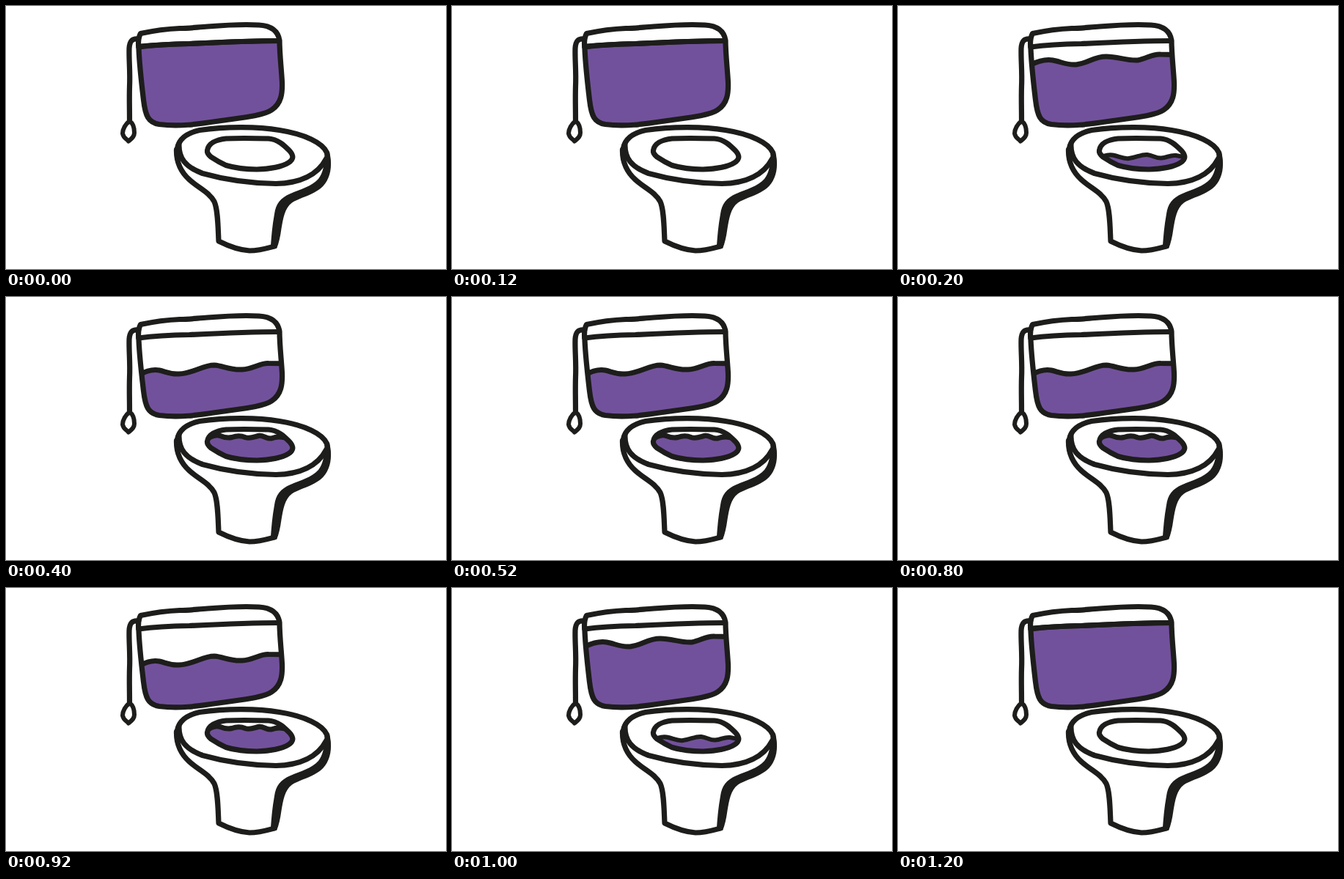
These frames come from a looping animation (600 px wide and 359 px high, 1.4 s). An HTML page:

```html
<!DOCTYPE html>
<html lang="en">
<head>
<meta charset="utf-8">
<title>Flush</title>
<style>
  html, body { margin: 0; width: 100%; height: 100%; overflow: hidden; background: #fff; }
  svg { display: block; width: 100%; height: 100%; }
  .ink { fill: none; stroke: #1d1d1b; stroke-width: 7.2; stroke-linecap: round; stroke-linejoin: round; }
  .water { fill: #72519c; stroke: #1d1d1b; stroke-width: 7; stroke-linejoin: round; }
  .thin { stroke-width: 6; }

  /* Levels are held for 200 ms each: full, high, mid, low, mid, high, full */
  .level { visibility: hidden; animation: 1.4s step-end infinite; }
  .full { animation-name: full; }
  .high { animation-name: high; }
  .mid { animation-name: mid; }
  .low { animation-name: low; }
  @keyframes full {
    0%, 85.7142% { visibility: visible; }
    14.2857%, 100% { visibility: hidden; }
  }
  @keyframes high {
    0%, 28.5714%, 85.7142%, 100% { visibility: hidden; }
    14.2857%, 71.4285% { visibility: visible; }
  }
  @keyframes mid {
    0%, 42.8571%, 71.4285%, 100% { visibility: hidden; }
    28.5714%, 57.1428% { visibility: visible; }
  }
  @keyframes low {
    0%, 57.1428%, 100% { visibility: hidden; }
    42.8571% { visibility: visible; }
  }
</style>
</head>
<body>
<svg viewBox="0 0 600 359" role="img" aria-label="A cistern emptying into a toilet bowl and refilling">
  <defs>
    <path id="tank" d="M183.5 37.5 C180 44 180 50 181 58 C182 82 185 107 187.5 128 C190 150 194 159 209 161.5 C235 165 260 161.500 290 157 C320 152.500 350 150 362 142 C376 133 377 118 376.5 104 C375.5 85 373 65 373 47 C371 34 362 27 345 26 C322 24.5 300 26 275 28 C260 29 250 30.5 237 30.5 C215 31.5 200 34 183.5 37.5 Z"/>
    <path id="hole" d="M274.5 197 C276 188 286 182.500 300 181 C320 180 340 180.500 358 181 C372 182 381 192 387 198 C392 204 393 209 385 214 C377 219 360 222.500 342 223 C325 223 312 221 300 217.500 C290 213 284 209 279.500 206 C276 203 274 200 274.5 197 Z"/>
    <clipPath id="inTank"><use href="#tank"/></clipPath>
    <clipPath id="inHole"><use href="#hole"/></clipPath>
  </defs>

  <g clip-path="url(#inTank)">
    <path class="water level full" d="M170 56 C200 53.500 225 52 250 51.500 C290 49.500 330 47.500 385 47.500 V190 H170 Z"/>
    <path class="water level high" d="M176 83 C188 76 199 72 211 74 C222 76 231 81 243 80 C260 78 266 69 284 69 C300 69 312 75 327 74 C339 72 347 65 358 66 L390 67 V190 H170 Z"/>
    <path class="water level mid" d="M176 110 C186 103 198 98 209 100 C218 102 224 106 236 105 C256 104 268 93 284 93 C297 94 305 100 322 99 C338 98 346 90 358 90.500 L390 91 V190 H170 Z"/>
    <path class="water level low" d="M180 135 C189 131 196 127 204 128.500 C212 130 216 134 226 133 C242 131 250 121 265 121.500 C279 122 290 127 306 126 C325 124 336 115 352 115 C362 115 368 119 390 117 V190 H170 Z"/>
  </g>

  <g clip-path="url(#inHole)">
    <path class="water thin level high" d="M270 208 C280 205 287 202 295 204 C303 206 308 209 315 208 C325 207 332 202 340 203 C348 204 352 208 359 207.500 C367 207 371 203 379 204 L400 208 V240 H270 Z"/>
    <path class="water level mid" d="M268 199 C277 191 285 187 292 189.500 C298 192 302 193 308 191.500 C315 189 320 189 326 191.500 C333 194 338 191 344 189.500 C351 188 355 194 362 193 C370 190 379 190 398 197 V240 H268 Z"/>
    <path class="water level low" d="M260 170 H405 V240 H260 Z"/>
  </g>

  <g class="ink">
    <use href="#tank"/>
    <path d="M181 56 C200 53.500 225 52 250 51.500 C290 49.500 330 47.500 372 47.500"/>
    <path d="M180.500 45 C172 44 168.500 48 168 58 C167.500 75 169.500 90 168.500 110 C168 125 168.500 140 168.500 156"/>
    <path class="thin" d="M168.500 157 C163 161 159 168 159 174 C160 180 164 181 167 184.500 C171 181 175 179 175 173 C175 166 173 160 168.500 157 Z"/>

    <use href="#hole"/>
    <path d="M233 200 C233 184 243 174 264 169.500 C300 164 345 164.500 373 169.500 C408 175 432 187 437.500 200 L439 212"/>
    <path d="M236 188 C235 208 245 220 268 228.500 C300 237.500 335 242 368 242.500 C400 242 425 231 437 208"/>
    <path d="M232.500 196 C232 212 237 225 250 237 C262 248 277 254 284 267 C289 278 289 300 290 321 C300 326 315 333 332 334 C345 334 355 331 366 328"/>
  </g>
  <path fill="#1d1d1b" d="M441 199 C446 220 442 238 429 249 C416 259 400 262 390 268.500 C380 276 378 290 375.500 304 C374 315 372 324 369 331 L361 327 C362 314 363 300 366 284 C368 270 374 262 388 256 C402 250 417 246 426 236 C433 227 433 217 436 206 Z"/>
</svg>
</body>
</html>
```
